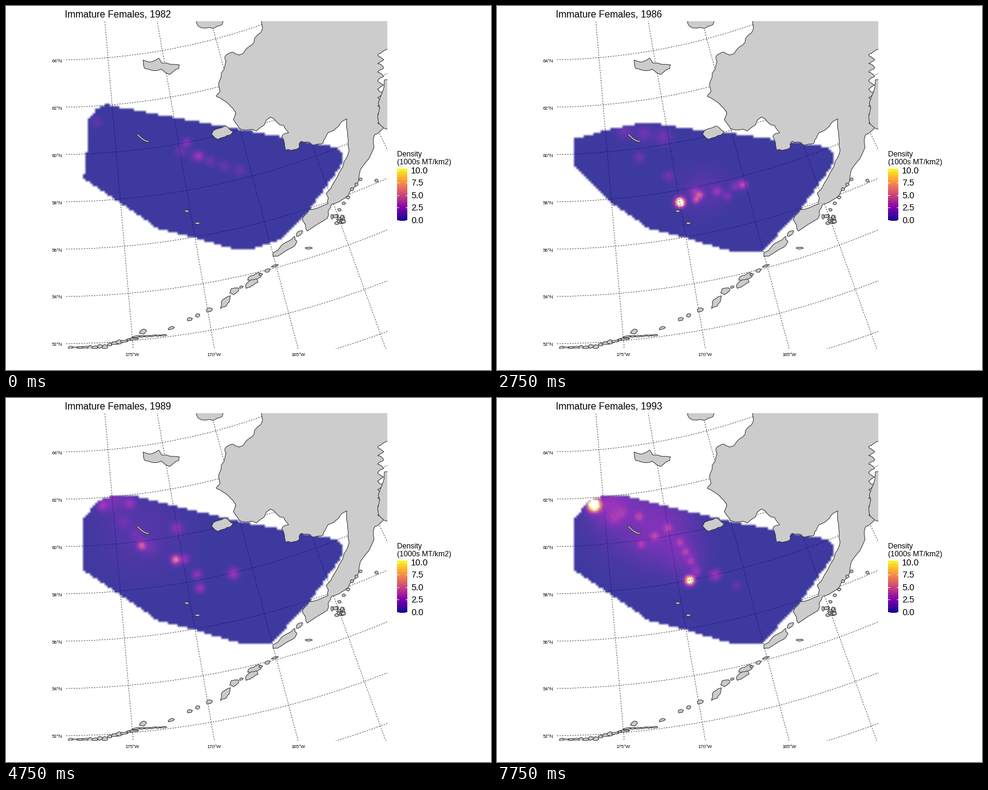
Recreate the animation shown at these times as a matplotlib script. Size 800 px wide and 600 px high, loop 8000 ms.

```python
import numpy as np
import matplotlib
import matplotlib.pyplot as plt
from matplotlib.animation import FuncAnimation
from matplotlib.path import Path
from matplotlib.patches import Polygon

W, H, DPI = 800, 600, 100
PX = 72 / DPI
FRAMES, INTERVAL = 32, 250
MAP = (97, 25, 629, 565)
BAR = (645, 268, 662, 354)
CELL = 4
ALPHA = 0.8
INK = "#333333"

plt.rcParams["font.family"] = "Liberation Sans"
plasma = matplotlib.colormaps["plasma"]
rng = np.random.default_rng(7)

fig = plt.figure(figsize=(W / DPI, H / DPI), dpi=DPI, facecolor="white")


def add_axes(x0, y0, x1, y1):
    ax = fig.add_axes([x0 / W, 1 - y1 / H, (x1 - x0) / W, (y1 - y0) / H])
    ax.axis("off")
    return ax


def use_pixels(ax, x0, y0, x1, y1):
    ax.set_aspect("auto")
    ax.set_xlim(x0, x1)
    ax.set_ylim(y1, y0)


def label(x, y, text, size, **kw):
    return fig.text(x / W, 1 - y / H, text, fontsize=size * PX, color="black", **kw)


# ---- density surfaces ------------------------------------------------------

gx, gy = np.meshgrid(np.arange(121.0, 566, CELL), np.arange(155.5, 415, CELL))
extent = [gx.min() - CELL / 2, gx.max() + CELL / 2, gy.max() + CELL / 2, gy.min() - CELL / 2]
knots = np.cos(2 * np.pi * (gx + 0.15 * gy) / 11.5) * np.cos(2 * np.pi * (gy - 0.15 * gx) / 11.5)


def spot(x, y, amp, s=5):
    return amp * np.exp(-((gx - x) ** 2 + (gy - y) ** 2) / (2 * s * s))


def trail(x0, y0, x1, y1, n, amp, s=5):
    """Equal spots along a straight line."""
    return sum(spot(x, y, amp, s) for x, y in zip(np.linspace(x0, x1, n), np.linspace(y0, y1, n)))


def hull(north, west_low, tip=((437, 406), (390, 406))):
    """Survey outline: the north edge varies, the east and south hardly do."""
    east = [(545, 233), (553, 240), (556, 259), (500, 337)]
    return north + east + list(tip) + [(308, 382), (250, 367), (190, 326), (128, west_low)]


def surface(outline, v, cap=10, fade=0.0):
    """RGB and alpha of one map; cells above the cap fade out."""
    v = v * (1 - 0.1 * knots)
    pts = np.column_stack([gx.ravel(), gy.ravel()])
    inside = Path(outline).contains_points(pts).reshape(gx.shape)
    rgb = plasma(np.clip(v / 10, 0, 1))[..., :3]
    alpha = np.where(inside, ALPHA, 0.0)
    over = v > cap
    alpha[over] *= fade
    rgb[over] = plasma(0.42)[:3] if fade else (1, 0.97, 0.85)
    rgb[~inside] = plasma(0.0)[:3]
    return rgb, alpha


ARCHED = [(128, 219), (190, 203), (230, 195), (270, 195), (310, 202), (390, 211)]
SLOPED = [(128, 200), (152, 169), (176, 162), (213, 162), (380, 203)]

KEYS = {
    0: surface(
        hull([(133, 240), (135, 188), (150, 170), (165, 162), (190, 168)], 285,
             [(450, 387), (405, 402), (380, 402)]),
        spot(298, 226, 2) + spot(319, 248, 2.3) + spot(150, 192, 0.8, 6)
        + trail(288, 240, 385, 272, 5, 1, 6)),
    4: surface(
        hull(ARCHED, 285),
        spot(195, 213, 2.2) + trail(207, 203, 237, 203, 2, 1.8, 6)
        + trail(228, 238, 242, 243, 2, 1.1) + spot(225, 215, 0.4, 20)),
    11: surface(
        hull(ARCHED, 266),
        spot(302, 324, 15) + trail(328, 320, 335, 312, 2, 4.3, 4) + spot(405, 295, 4)
        + trail(326, 307, 363, 306, 2, 2.5) + trail(380, 314, 392, 298, 2, 1.6)
        + trail(235, 250, 283, 281, 2, 1.2, 6) + trail(210, 206, 275, 216, 3, 1.2, 9)
        + spot(340, 305, 0.6, 26)),
    14: surface(
        hull([(128, 202), (155, 170), (180, 170), (370, 203)], 257),
        spot(242, 196, 20, 8) + spot(237, 210, 8) + spot(288, 241, 5) + spot(173, 173, 1.6, 8)
        + trail(210, 213, 280, 215, 2, 3.3) + trail(211, 246, 234, 250, 2, 1.8)
        + trail(291, 307, 339, 324, 4, 8) + spot(310, 329, 11)
        + trail(363, 306, 342, 337, 3, 2.4)
        + spot(240, 205, 3, 28) + spot(325, 318, 2.2, 22) + spot(270, 260, 1, 65)),
    19: surface(
        hull(SLOPED, 285),
        spot(224, 244, 4.6) + spot(280, 267, 6.3) + spot(295, 266, 2.4)
        + spot(282, 215, 2, 6) + spot(375, 290, 2.8, 6) + trail(159, 178, 204, 174, 2, 2.2, 6)
        + trail(315, 291, 320, 314, 2, 2.6) + trail(193, 205, 240, 247, 3, 0.8, 8)
        + spot(175, 165, 1.5, 14) + spot(220, 220, 0.5, 50)),
    24: surface(
        hull(SLOPED, 285),
        spot(223, 210, 7.5) + spot(237, 210, 3.6) + spot(234, 196, 1.8) + spot(238, 241, 4.5)
        + spot(231, 248, 2.3) + spot(314, 289, 8, 5.5)
        + trail(277, 257, 286, 293, 4, 2) + trail(329, 288, 335, 311, 3, 2.6)
        + trail(185, 176, 201, 175, 2, 1.4)
        + spot(225, 205, 2.1, 22) + spot(310, 288, 1.8, 24) + spot(260, 220, 1, 50),
        cap=7, fade=0.4),
    31: surface(
        hull(SLOPED, 285),
        spot(160, 177, 18, 6.5) + spot(234, 196, 2.4) + spot(318, 301, 13.5)
        + spot(360, 292, 2.8, 6) + spot(395, 310, 1)
        + trail(238, 242, 282, 215, 3, 2.3) + trail(302, 238, 329, 286, 4, 2.3)
        + trail(193, 200, 207, 190, 2, 1.2, 7)
        + spot(185, 178, 1.8, 20) + spot(275, 225, 1.1, 35) + spot(310, 265, 0.9, 20)
        + spot(230, 190, 1.1, 50)),
}


def density(i):
    """Colour blend of the two maps around step i."""
    a = max(s for s in KEYS if s <= i)
    b = min(s for s in KEYS if s >= i)
    t = (i - a) / (b - a) if b > a else 0
    (rgb_a, al_a), (rgb_b, al_b) = KEYS[a], KEYS[b]
    wa, wb = (1 - t) * (al_a + 1e-3), t * (al_b + 1e-3)
    rgb = (rgb_a * wa[..., None] + rgb_b * wb[..., None]) / (wa + wb)[..., None]
    return np.dstack([rgb, (1 - t) * al_a + t * al_b])


# ---- map -------------------------------------------------------------------

chart = add_axes(*MAP)
raster = chart.imshow(density(0), extent=extent, interpolation="bilinear", zorder=2)
use_pixels(chart, *MAP)


def project(lon, lat):
    r = 1512 - 39 * (lat - 52)
    a = np.radians(0.992 * (lon + 180))
    return 78 + r * np.sin(a), -955 + r * np.cos(a)


def grid_line(lon, lat):
    chart.plot(*project(lon, lat), color="black", lw=0.7 * PX, dashes=(3, 3),
               dash_capstyle="butt", zorder=1)


for lat in range(50, 68, 2):
    grid_line(np.linspace(-180, -148, 150), np.full(150, lat))
for lon in range(-175, -149, 5):
    grid_line(np.full(60, lon), np.linspace(46, 70, 60))


def roughen(pts, rounds, k):
    """Closed outline with randomly shifted midpoints."""
    p = np.array(pts, float)
    for _ in range(rounds):
        d = np.roll(p, -1, axis=0) - p
        limit = 15 / np.maximum(np.hypot(*d.T), 15)
        shift = (rng.uniform(-k, k, len(p)) * limit)[:, None]
        mid = p + d / 2 + shift * np.column_stack([-d[:, 1], d[:, 0]])
        p = np.stack([p, mid], axis=1).reshape(-1, 2)
    return p


def land(pts, rounds=2, k=0.15):
    chart.add_patch(Polygon(roughen(pts, rounds, k), facecolor="#cccccc", edgecolor=INK,
                            lw=0.95 * PX, zorder=3))


def island(x, y, rx, ry, tilt=0.0):
    """Rough ellipse whose right end rises by the tilt."""
    a = np.linspace(0, 2 * np.pi, 10, endpoint=False)
    r = rng.uniform(0.75, 1.15, 10)
    u, v = rx * r * np.cos(a), ry * r * np.sin(a)
    c, s = np.cos(tilt), np.sin(tilt)
    land(np.column_stack([x + u * c + v * s, y - u * s + v * c]), 1)


west_coast = [
    (421, 15), (423, 38), (409, 60), (392, 77), (384, 81), (375, 76), (361, 84), (361, 98),
    (352, 124), (353, 140), (347, 149), (358, 155), (371, 166), (379, 178), (375, 187),
    (385, 202), (413, 206), (436, 183), (458, 197), (466, 209), (455, 215), (461, 237),
    (470, 238), (483, 234), (487, 223), (505, 229), (523, 226), (531, 209), (562, 186)]
peninsula = [
    (563, 205), (566, 238), (550, 274), (528, 309), (531, 326), (500, 336), (489, 353),
    (497, 371), (530, 350), (537, 327), (560, 316), (577, 297), (590, 262), (604, 240),
    (608, 212)]
inlets = [(618 + 5 * (-1) ** k, 200 - 7 * k) for k in range(19)]

land(west_coast + peninsula + inlets + [(640, 66), (640, 15)])
land([(640, 122), (624, 122), (614, 160), (614, 190), (628, 203), (640, 203)])
land([(312, 15), (317, 33), (342, 37), (356, 31), (358, 15)])
land([(226, 89), (240, 92), (252, 86), (257, 94), (286, 97), (285, 103), (270, 113),
      (256, 104), (241, 106), (229, 103)], 2, 0.1)
island(355, 209, 20, 10, 0.1)
island(298, 338, 4, 2)
island(316, 358, 4, 2)

# thin crescent island with a pale core
t = np.linspace(0, 1, 12)
for color, width in [(INK, 3), ("#f0f0d0", 1.2)]:
    chart.plot(217 + 18 * t, 212 + 11 * np.sin(t * np.pi / 2), color=color, lw=width * PX, zorder=4)

# island arc: large islands, then small ones strung along a curve
for spec in [(461, 397, 24, 7, 0.65), (484, 375, 7, 3, 0.6), (410, 447, 13, 5, 0.4),
             (404, 458, 13, 5, 0.5), (376, 470, 8, 5, 0.4), (362, 488, 13, 5, 0.9),
             (226, 537, 6, 4, 0.3), (499, 399, 6, 1.5)]:
    island(*spec)


def arc_y(x):
    return np.interp(x, [105, 160, 200, 272, 335, 390, 450], [563, 561, 551, 531, 501, 462, 424])


for x in np.arange(107, 215, 8):
    island(x, arc_y(x) + rng.uniform(-1, 2), rng.uniform(4, 8), rng.uniform(1.5, 3.5), 0.1)
for x in np.arange(215, 262, 9):
    island(x, 545 - 0.05 * (x - 215), rng.uniform(5, 7), 1.3, 0.1)
for x in [272, 303, 316, 335, 388, 420, 431, 443]:
    island(x, arc_y(x), rng.uniform(3, 6), rng.uniform(1.5, 3), 0.3)
for _ in range(12):
    island(rng.normal(554, 9), rng.normal(352, 4), rng.uniform(2, 5), rng.uniform(2, 4))
for k in range(6):
    island(550 + 7 * k, 334 - 10 * k + rng.uniform(-3, 3), 3, 2.5)
island(611, 288, 3, 2.5)

# ---- labels and legend -----------------------------------------------------

title = label(97, 19, "", 15.8)
for k in range(7):
    label(93, 93 + 77.9 * k, f"{64 - 2 * k}°N", 7.8, ha="right")
for x, lon in [(208, 175), (343, 170), (482, 165)]:
    label(x, 577, f"{lon}°W", 7.8, ha="center")

label(645, 248, "Density", 12.2)
label(645, 261, "(1000s MT/km2)", 12.2)
bar = add_axes(*BAR)
x0, y0, x1, y1 = BAR
bar.imshow(plasma(np.linspace(1, 0, y1 - y0))[:, None, :], extent=[x0, x1, y1, y0])
use_pixels(bar, *BAR)
for k in range(5):
    y = 271 + 20.4 * k
    label(668, y + 5, f"{10 - 2.5 * k:.1f}", 14.5)
    for x in (x0, x1 - 3.4):
        bar.plot([x, x + 3.4], [y, y], color="white", lw=PX, solid_capstyle="butt")


def update(i):
    title.set_text(f"Immature Females, {round(1982 + 35 * i / 99)}")
    raster.set_data(density(i))
    return title, raster


anim = FuncAnimation(fig, update, frames=FRAMES, interval=INTERVAL, repeat=True,
                     repeat_delay=0, blit=False)
plt.show()
```
